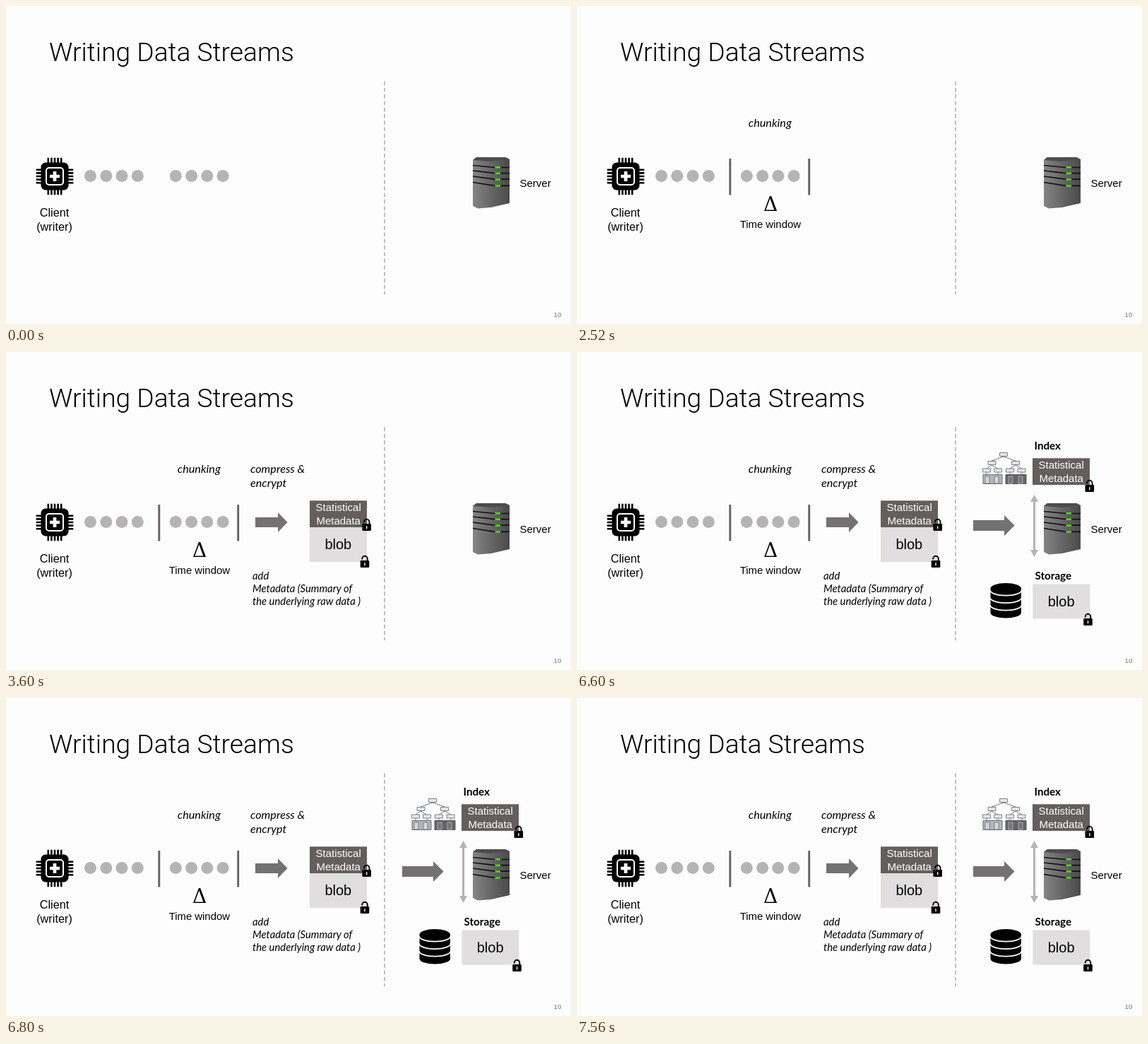
Animation of 800x450 px, one loop 8 s. Source, as an HTML page:

```html
<!DOCTYPE html>
<html lang="en">
<head>
<meta charset="utf-8">
<title>Writing Data Streams</title>
<style>
  html, body { margin: 0; width: 100%; height: 100%; overflow: hidden; background: #fdfdfd; }
  svg { display: block; width: 800px; height: 450px; }
  text { font: 15px "Liberation Sans", Arial, sans-serif; }
  .title { font: 300 37.2px Roboto, sans-serif; }
  .step { font: italic 16.2px Lato, sans-serif; }
  .note { font-size: 14.8px; }
  .head { font: bold 15.2px Lato, sans-serif; }
  .client { font-size: 16.3px; }
  .mid { text-anchor: middle; }
  .arrow { fill: #737171; }
  [data-from] { visibility: hidden; }
</style>
</head>
<body>
<svg viewBox="0 0 800 450">
  <defs>
    <linearGradient id="face"><stop stop-color="#858585"/><stop offset=".5" stop-color="#666"/><stop offset="1" stop-color="#4a4a4a"/></linearGradient>
    <g id="dots" fill="#b5b3b4">
      <circle r="8.5"/><circle cx="22.3" r="8.5"/><circle cx="44.5" r="8.5"/><circle cx="66.8" r="8.5"/>
    </g>
    <g id="lock">
      <rect x="-6.3" y="-10" width="12.6" height="10" rx="1.2"/>
      <path d="M-3.8-11.5v-1a3.8 3.8 0 0 1 7.6 0V-9" fill="none" stroke="#000" stroke-width="1.9"/>
      <path d="M0-6.2v3" stroke="#fff" stroke-width="1.4" stroke-linecap="round"/>
    </g>
    <g id="metadata" class="mid" fill="#fff">
      <rect width="81" height="37.7" fill="#645e5e"/>
      <text x="40.7" y="15">Statistical</text>
      <text x="40.7" y="33.3">Metadata</text>
    </g>
    <g id="blob" class="mid">
      <rect width="81" height="49" fill="#e0dede"/>
      <text x="40.3" y="31" style="font-size:20px">blob</text>
    </g>
    <path id="pins" d="M-9.2-26.3V26.3M-4.6-26.3V26.3M0-26.3V26.3M4.6-26.3V26.3M9.2-26.3V26.3" stroke="#000" stroke-width="2.6"/>
    <path id="node" d="M-5.5-2.5H5.5V2.5H-5.5z" fill="#e4e6ea" stroke="#70757e" stroke-width=".9"/>
  </defs>

  <text class="title" x="61" y="78">Writing Data Streams</text>
  <path d="M536 106.500V408" stroke="#b6b6b6" stroke-width="1.7" stroke-dasharray="5.7 3.6"/>
  <text x="775.500" y="440" fill="#777" style="font-size:9.700px">10</text>

  <g transform="translate(69 241)">
    <use href="#pins"/><use href="#pins" transform="rotate(90)"/>
    <rect x="-19.500" y="-19.500" width="39" height="39" rx="6.500"/>
    <rect x="-12" y="-12" width="24" height="24" rx="4" fill="none" stroke="#fff" stroke-width="2"/>
    <path d="M-7 0H7M0-7V7" stroke="#fff" stroke-width="4.700"/>
  </g>
  <g class="mid">
    <text class="client" x="68.500" y="298">Client</text>
    <text class="client" x="68.500" y="318">(writer)</text>
  </g>
  <use href="#dots" x="119.500" y="240.500"/>
  <use href="#dots" x="240.300" y="240.500"/>

  <g id="server">
    <path d="M661 218L666 214H707L713 217V279L687 285L668 286.500L661 283z" fill="url(#face)"/>
    <path d="M661 218L666 214H707L713 217L685 220z" fill="#4d4d4d"/>
    <path d="M661 225.500L692 228.500H713M661 233L692 236.700H713M661 241L692 245.200H713M661 249.500L692 254.300H713" fill="none" stroke="#111" stroke-width="1.700"/>
    <path d="M692.500 228.200h7.500M692.500 236.700h7.500M692.500 245.400h7.500M692.500 254.400h7.500" stroke="#4be01c" stroke-width="2.500"/>
  </g>
  <text x="727.500" y="255.700">Server</text>

  <g data-from="900">
    <text class="step mid" x="273.300" y="171">chunking</text>
    <path d="M216.800 216V267.500M328.700 216V267.500" stroke="#666363" stroke-width="2.900"/>
    <text class="mid" x="274" y="290" style="font:28px 'DejaVu Serif',serif">Δ</text>
    <text class="mid" x="273.800" y="314" style="font-size:14.900px">Time window</text>
  </g>

  <g data-from="3600">
    <text class="step" x="346" y="171">compress &amp;</text>
    <text class="step" x="346" y="191">encrypt</text>
    <path class="arrow" d="M353 234H385V227L398.500 241L385 255V248H353z"/>
    <use href="#metadata" x="430" y="210.300"/>
    <use href="#blob" x="430" y="248"/>
    <use href="#lock" x="510.700" y="253"/>
    <use href="#lock" x="508" y="305"/>
    <text class="step note" x="349" y="322">add</text>
    <text class="step note" x="349" y="340">Metadata (Summary of</text>
    <text class="step note" x="349" y="357.500">the underlying raw data )</text>
  </g>

  <g data-from="6600">
    <path class="arrow" d="M561 238H605V231L619.500 245.500L605 260V253H561z"/>
    <path d="M647.500 202l5.500 10h-4v68h4l-5.500 10l-5.500-10h4v-68h-4z" fill="#b5b3b3"/>

    <text class="head" x="647.500" y="138">Index</text>
    <use href="#metadata" x="645" y="150.300"/>
    <use href="#lock" x="725.800" y="198"/>
    <g id="tree">
      <path d="M604 148L587 154M604 148L621 154M587 160L580 165M587 160L596 165M621 160L613 165M621 160L630 165M580 170V174M596 170V174M613 170V174M630 170V174" stroke="#777" fill="none"/>
      <use href="#node" x="604" y="145"/>
      <use href="#node" x="587.500" y="157"/><use href="#node" x="621" y="157"/>
      <use href="#node" x="580" y="167.500"/><use href="#node" x="596" y="167.500"/>
      <use href="#node" x="613" y="167.500"/><use href="#node" x="629.500" y="167.500"/>
      <path d="M575 173.500h27v13h-27z" fill="#b3b5ba" stroke="#686c74"/>
      <path d="M607 173.500h29v13h-29z" fill="#666468" stroke="#55555a"/>
      <path d="M578 176h6v10h-6zM591 176h6v10h-6z" fill="#d5d8de" stroke="#686c74" stroke-width=".800"/>
      <path d="M611 176h6v10h-6zM625 176h6v10h-6z" fill="#77757a" stroke="#b5b5ba" stroke-width=".800"/>
    </g>

    <text class="head" x="648.500" y="322">Storage</text>
    <use href="#blob" x="645.300" y="328.500"/>
    <use href="#lock" x="723.500" y="387"/>
    <path d="M585.500 334.500a21.700 7.500 0 0 1 43.400 0V369a21.700 7.500 0 0 1-43.400 0z"/>
    <path d="M585 337a22 7.500 0 0 0 44.500 0M585 347.500a22 7.500 0 0 0 44.500 0M585 358a22 7.500 0 0 0 44.500 0" fill="none" stroke="#fdfdfd" stroke-width="1.700"/>
  </g>
</svg>
<script>
  const LOOP = 8000;
  const stages = [...document.querySelectorAll('[data-from]')];

  function render(now) {
    const time = now % LOOP;
    for (const stage of stages) {
      stage.style.visibility = time >= +stage.dataset.from ? 'visible' : 'hidden';
    }
  }

  function tick() {
    render(performance.now());
    requestAnimationFrame(tick);
  }
  tick();
</script>
</body>
</html>
```
